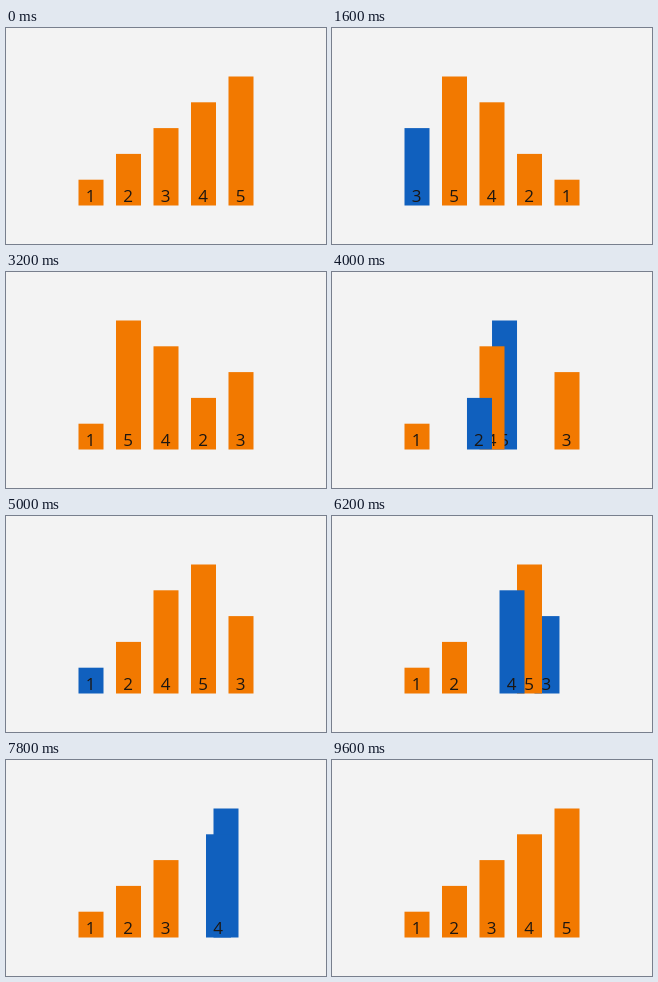
Recreate the animation shown at these times as an HTML page with a canvas. Size 320 by 216 pixels, loop 10000 ms.

```html
<!DOCTYPE html>
<html lang="en">
<head>
<meta charset="utf-8">
<title>Sorting bars</title>
<style>
  html, body { margin: 0; width: 100%; height: 100%; overflow: hidden; background: #f3f3f3; }
  canvas { display: block; }
</style>
</head>
<body>
<canvas id="stage" width="320" height="216"></canvas>
<script>
const ctx = document.getElementById('stage').getContext('2d');
const LOOP = 10000, STEP = 200, MOVE = 1000;
const SHUFFLE_AT = 600, PIVOT_AT = 800;
const ORANGE = '#f27900', BLUE = '#1060be';
const SHUFFLED = [3, 5, 4, 2, 1]; // also the stacking order, back to front

// Quicksort exchanges: start time and the two slots; a slot may meet itself
const SWAPS = [[2017, 0, 4], [3333, 1, 3], [4633, 0, 0], [5933, 2, 4], [7200, 3, 4]];

function stateAt(t) {
  const order = t < SHUFFLE_AT ? [1, 2, 3, 4, 5] : [...SHUFFLED];
  const slot = {}, active = new Set();
  if (t >= PIVOT_AT && t < SWAPS[0][0]) active.add(order[0]);
  let moving = null;
  for (const [start, a, b] of SWAPS) {
    if (t >= start + MOVE) {
      [order[a], order[b]] = [order[b], order[a]];
    } else if (t >= start - 50) {
      moving = { a, b, p: Math.max(0, (t - start) / MOVE) };
    }
  }
  order.forEach((n, i) => slot[n] = i);
  if (moving) {
    const { a, b, p } = moving;
    active.add(order[a]).add(order[b]);
    slot[order[a]] = a + (b - a) * p;
    slot[order[b]] = b + (a - b) * p;
  }
  return { slot, active };
}

function drawBar(n, slot, color) {
  const x = 72.5 + 37.5 * slot, height = 25.8 * n;
  ctx.fillStyle = color;
  ctx.fillRect(x, 177.5 - height, 25, height);
  ctx.fillStyle = '#1c1611';
  ctx.fillText(n, x + 12, 174);
}

function frame(now) {
  const t = Math.floor(now % LOOP / STEP) * STEP;
  const { slot, active } = stateAt(t);
  ctx.fillStyle = '#f3f3f3';
  ctx.fillRect(0, 0, 320, 216);
  ctx.font = '17px "Open Sans", "Noto Sans", sans-serif';
  ctx.textAlign = 'center';
  for (const n of SHUFFLED) drawBar(n, slot[n], active.has(n) ? BLUE : ORANGE);
  requestAnimationFrame(frame);
}
requestAnimationFrame(frame);
</script>
</body>
</html>
```
